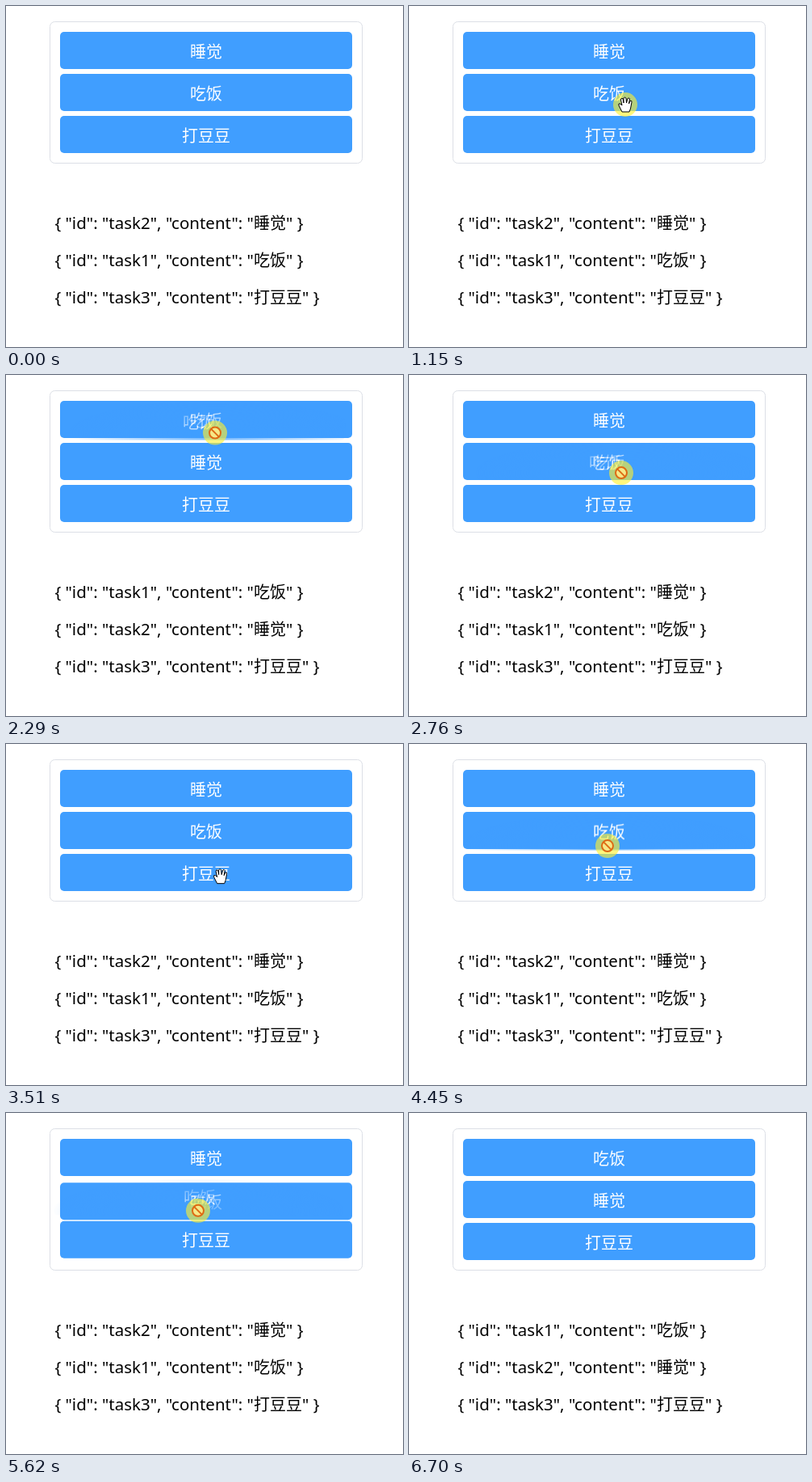
Recreate the animation shown at these times as an HTML page. Size 492 px wide and 422 px high, loop 7.5 s.

```html
<!DOCTYPE html>
<html lang="zh-CN">
<head>
<meta charset="utf-8">
<title>Drag sort</title>
<style>
  html, body { margin: 0; width: 100%; height: 100%; overflow: hidden; background: #fff; }
  svg { display: block; }
  .label { font: 20px "Noto Sans CJK SC", "Noto Sans CJK", sans-serif; fill: #fff; text-anchor: middle; }
  .line { font: 20.5px "Noto Sans", "Open Sans", sans-serif; white-space: pre; }
  .line tspan { font: 20px "Noto Sans CJK SC", "Noto Sans CJK", sans-serif; }
  .bar { fill: #409eff; }
</style>
</head>
<body>
<svg width="492" height="422" viewBox="0 0 492 422">
  <defs>
    <radialGradient id="fade">
      <stop offset="0" stop-color="#fff" stop-opacity=".82"/>
      <stop offset="1" stop-color="#fff" stop-opacity="0"/>
    </radialGradient>
    <mask id="spot" maskUnits="userSpaceOnUse" x="-190" y="-45" width="380" height="90">
      <ellipse rx="181" ry="40" fill="url(#fade)"/>
    </mask>
  </defs>
  <rect x="54.5" y="19.5" width="387" height="175" rx="6" fill="#fff" stroke="#dcdfe6"/>
  <g id="list"></g>
  <g id="lines"></g>
  <g id="pointer">
    <g id="ghost" mask="url(#spot)"><g id="ghostItem"></g></g>
    <circle id="press" r="15" fill="#fff02d" fill-opacity=".62"/>
    <g id="blocked" fill="#f6e887" stroke="#de6a14" stroke-width="2">
      <circle r="7"/><path d="M-5-5L5 5"/>
    </g>
    <path id="hand" fill="#fff" stroke="#000" stroke-linejoin="round"
      d="M-4 9L-8 1q-1-3 2-2L-4 1L-5.5-6q0-2.5 2.5-1.5L-2-2V-8q1.5-2 3 0L1.5-2L3-7.5q2-1.5 2.5.5L4.5-1L6-4.5q2.5-1 2 1.5L6.5 5L5 9z"/>
    <path id="arrow" fill="#fff" stroke="#000" d="M.5.5V16l3.6-3.3 2.4 5.6 2.4-1-2.4-5.4h5z"/>
  </g>
</svg>
<script>
const LOOP = 7500, SLIDE = 150, PITCH = 52;
const names = { 1: '吃饭', 2: '睡觉', 3: '打豆豆' };
const $ = id => document.getElementById(id);

// Item order from each moment on
const orders = [
  [0, '213'], [1605, '123'], [2420, '213'], [2890, '231'], [3130, '213'],
  [4590, '231'], [5490, '213'], [5955, '123']
];

// Pointer path: time, x, y
const path = [
  [190, 464, 399], [260, 464, 374], [500, 344, 200], [690, 290, 146], [880, 268, 122],
  [1350, 268, 122], [1690, 258, 62], [1890, 258, 57],
  [2150, 258, 57], [2420, 260, 85], [2760, 263, 121], [2900, 264, 138], [3310, 266, 164],
  [3910, 265, 163], [4190, 246, 126],
  [4450, 246, 126], [4600, 244, 140], [4940, 238, 174],
  [5190, 238, 174], [5620, 238, 121], [5900, 241, 85], [6230, 244, 65],
  [6490, 244, 65], [6560, 320, 165], [6630, 469, 403]
];
const HIDE_AT = 6700;

// Press, drag start, release, and the ghost's offset from the pointer
const drags = [
  { press: 1150, start: 1350, end: 3510, offset: [-20, -14] },
  { press: 4450, start: 4450, end: 6490, offset: [2, -17.5] }
];

const itemMarkup = id =>
  `<rect class="bar" x="-181" y="-23" width="362" height="46" rx="5"/><text class="label" y="8.5">${names[id]}</text>`;

const items = {};
for (const id of '123') {
  items[id] = document.createElementNS('http://www.w3.org/2000/svg', 'g');
  items[id].innerHTML = itemMarkup(id);
}
$('ghostItem').innerHTML = itemMarkup(1);

const place = (el, x, y) => el.setAttribute('transform', `translate(${x} ${y})`);
const show = (el, on) => el.setAttribute('visibility', on ? 'visible' : 'hidden');
const mix = (a, b, k) => a + (b - a) * k;
const ease = k => k * k * (3 - 2 * k);

function pointerAt(t) {
  const next = path.findIndex(p => p[0] > t);
  if (next < 0) return path[path.length - 1].slice(1);
  if (next === 0) return path[0].slice(1);
  const [t0, x0, y0] = path[next - 1], [t1, x1, y1] = path[next];
  const k = (t - t0) / (t1 - t0);
  return [mix(x0, x1, k), mix(y0, y1, k)];
}

let shownOrder = '';
function applyOrder(order) {
  if (order === shownOrder) return;
  shownOrder = order;
  for (const id of order) $('list').append(items[id]);
  $('lines').innerHTML = [...order].map((id, i) =>
    `<text class="line" x="60.4" y="${276 + 46 * i}">{ "id": "task${id}", "content": "<tspan>${names[id]}</tspan>" }</text>`
  ).join('');
}

function drawList(t) {
  let n = orders.length - 1;
  while (orders[n][0] > t) n--;
  const [since, order] = orders[n];
  const before = n ? orders[n - 1][1] : order;
  const k = ease(Math.min(1, (t - since) / SLIDE));
  applyOrder(order);
  for (const id of order)
    place(items[id], 248, 55 + PITCH * mix(before.indexOf(id), order.indexOf(id), k));
}

function drawPointer(t) {
  const [x, y] = pointerAt(t);
  const visible = t >= 190 && t < HIDE_AT;
  const drag = drags.find(d => t >= d.press && t < d.end);
  const dragging = !!drag && t >= drag.start;
  const overItem = y < 183 && x < 429;
  place($('pointer'), x, y);
  show($('press'), drag);
  show($('blocked'), dragging);
  show($('ghost'), dragging);
  show($('hand'), visible && !dragging && overItem);
  show($('arrow'), visible && !overItem);
  if (dragging) place($('ghostItem'), ...drag.offset);
}

const begin = performance.now();
function frame() {
  const t = (performance.now() - begin) % LOOP;
  drawList(t);
  drawPointer(t);
  requestAnimationFrame(frame);
}
frame();
</script>
</body>
</html>
```
